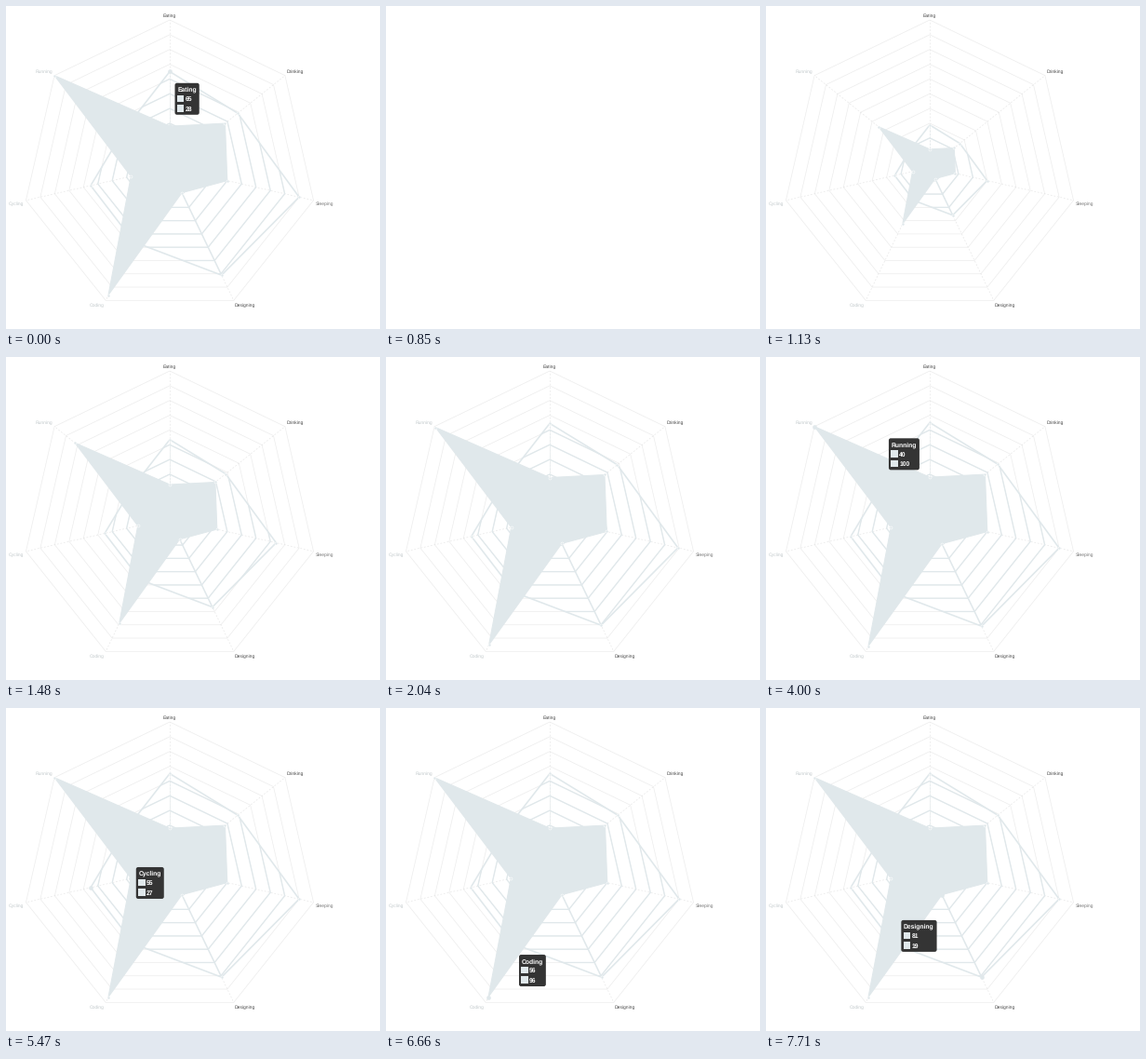
Write a matplotlib script that moves like this. It is 402 px wide and 347 px high and loops after 8 s.

```python
import numpy as np
import matplotlib.pyplot as plt
from matplotlib.animation import FuncAnimation
from matplotlib.collections import LineCollection
from matplotlib.patches import FancyBboxPatch, Polygon, Rectangle

W, H, DPI = 402, 347, 64
PX = 72 / DPI                      # points per pixel
LOOP, STEP = 8000, 20
CENTER, RADIUS = np.array([176, 173.5]), 158.5
TINT, GRID = "#e0e8eb", "#ececec"

NAMES = ["Eating", "Drinking", "Sleeping", "Designing",
         "Coding", "Cycling", "Running"]
FIRST = np.array([65, 59, 90, 81, 56, 55, 40])
SECOND = np.array([28, 48, 40, 19, 96, 27, 100])

# x, baseline, alignment and colour of the axis labels
LABELS = [(176, 11.8, "center", "#444444"), (302, 72.4, "left", "#444444"),
          (333, 214, "left", "#777777"), (246, 323, "left", "#444444"),
          (106, 323, "right", "#c3cacc"), (19.5, 214, "right", "#c3cacc"),
          (50, 72.4, "right", "#c3cacc")]

# start time and hovered axis
HOVERS = [(0, 0), (500, None), (2600, 1), (2810, 0), (4000, 6),
          (5470, 5), (6660, 4), (7710, 3)]
BLANK, GROW, GROW_START, GROW_TIME = 850, 920, 908, 1630

angles = 2 * np.pi * np.arange(7) / 7 - np.pi / 2
AXES = np.column_stack([np.cos(angles), np.sin(angles)])


def radar(values):
    """Corner points for values in percent of the full radius."""
    return CENTER + AXES * RADIUS * np.reshape(values, (-1, 1)) / 100


plt.rcParams["font.family"] = "Liberation Sans"
plt.rcParams["text.hinting"] = "none"
fig = plt.figure(figsize=(W / DPI, H / DPI), dpi=DPI, facecolor="white")
ax = fig.add_axes([0, 0, 1, 1])
ax.set(xlim=(0, W), ylim=(H, 0))
ax.axis("off")

# scale
rings = [radar(np.full(7, p))[np.r_[0:7, 0]] for p in range(10, 101, 10)]
spokes = [[CENTER, end] for end in radar(np.full(7, 100))]


def add_lines(segments, color, width, z, style="solid"):
    lines = LineCollection(segments, colors=color, linewidths=width * PX,
                           linestyles=style, zorder=z)
    return ax.add_collection(lines, autolim=False)


chart = [add_lines(rings, GRID, 0.7, 1),
         add_lines(spokes, "#e4e4e4", 0.6, 1, (0, (3, 3)))]
inner = [add_lines(rings, TINT, 1.3, 2),
         add_lines([spokes[3]], TINT, 1.5, 2),
         add_lines([spokes[0]], TINT, 0.7, 2, (0, (3, 2)))]

for name, (x, y, side, color) in zip(NAMES, LABELS):
    chart.append(ax.text(x, y, name, ha=side, va="baseline", color=color,
                         size=5 * PX))


# data
def add_area(values, z, **style):
    area = ax.add_patch(Polygon(radar(values), closed=True, zorder=z,
                                joinstyle="round", **style))
    dots, = ax.plot([], [], "o", ms=3 * PX, mfc=TINT, mec="white",
                    mew=0.5 * PX, zorder=z + 0.1)
    return values, area, dots


areas = [add_area(FIRST, 3, fill=False, ec=TINT, lw=1.6 * PX),
         add_area(SECOND, 4, fc=TINT, ec=TINT, lw=1 * PX)]
hover_dots, = ax.plot([], [], "o", ms=4 * PX, mfc=TINT, mec=TINT,
                      mew=0.5 * PX, zorder=5)
chart += inner + [part for _, area, dots in areas for part in (area, dots)]

# tooltip
TIP_H = 34
box = ax.add_patch(FancyBboxPatch((0, 0), 30, TIP_H, fc="#343434", ec="none",
                                  boxstyle="round,pad=0,rounding_size=2.2",
                                  zorder=8))
swatches = [ax.add_patch(Rectangle((0, 0), 7.6, 7.6, fc=TINT, ec="none",
                                   zorder=9)) for _ in range(2)]
title, *numbers = [ax.text(0, 0, "", color="white", weight="bold",
                           size=6.8 * PX, va="baseline", zorder=9)
                   for _ in range(3)]
tooltip = [box, title, hover_dots, *swatches, *numbers]


def title_width(name):
    title.set_text(name)
    return title.get_window_extent().width


tip_widths = [title_width(name) + 5.6 for name in NAMES]


def show(parts, visible):
    for part in parts:
        part.set_visible(visible)


def set_scale(scale):
    for values, area, dots in areas:
        points = radar(values * scale)
        area.set_xy(points)
        dots.set_data(points[:, 0], points[:, 1])
    for lines in inner:
        lines.set_clip_path(Polygon(radar(FIRST * scale), closed=True,
                                    transform=ax.transData))


def set_tooltip(i):
    points = np.array([radar(FIRST)[i], radar(SECOND)[i]])
    hover_dots.set_data(points[:, 0], points[:, 1])
    low, high = points[:, 0].min(), points[:, 0].max()
    width = tip_widths[i]
    x = low - 5.5 - width if low > W / 2 - 20 else high + 5.5
    y = points[:, 1].mean() - TIP_H / 2
    box.set_bounds(x, y, width, TIP_H)
    title.set_text(NAMES[i])
    title.set_position((x + 2.7, y + 9))
    for row, value in enumerate((FIRST[i], SECOND[i])):
        top = y + 12.8 + 10.6 * row
        swatches[row].set_xy((x + 2.2, top))
        numbers[row].set_text(str(value))
        numbers[row].set_position((x + 11.2, top + 6.6))


def draw(frame):
    t = frame * STEP + STEP / 2
    show(chart, not BLANK <= t < GROW)
    if GROW <= t < 2460:
        # the picture refreshes every 70 ms
        now = GROW + (t - GROW) // 70 * 70
        set_scale(1 - (1 - (now - GROW_START) / GROW_TIME) ** 4)
    else:
        set_scale(1)
    hovered = [axis for start, axis in HOVERS if start <= t][-1]
    show(tooltip, hovered is not None)
    if hovered is not None:
        set_tooltip(hovered)
    return chart + tooltip


anim = FuncAnimation(fig, draw, frames=LOOP // STEP, interval=STEP,
                     init_func=lambda: draw(0), repeat=True, repeat_delay=0,
                     blit=False)
plt.show()
```
